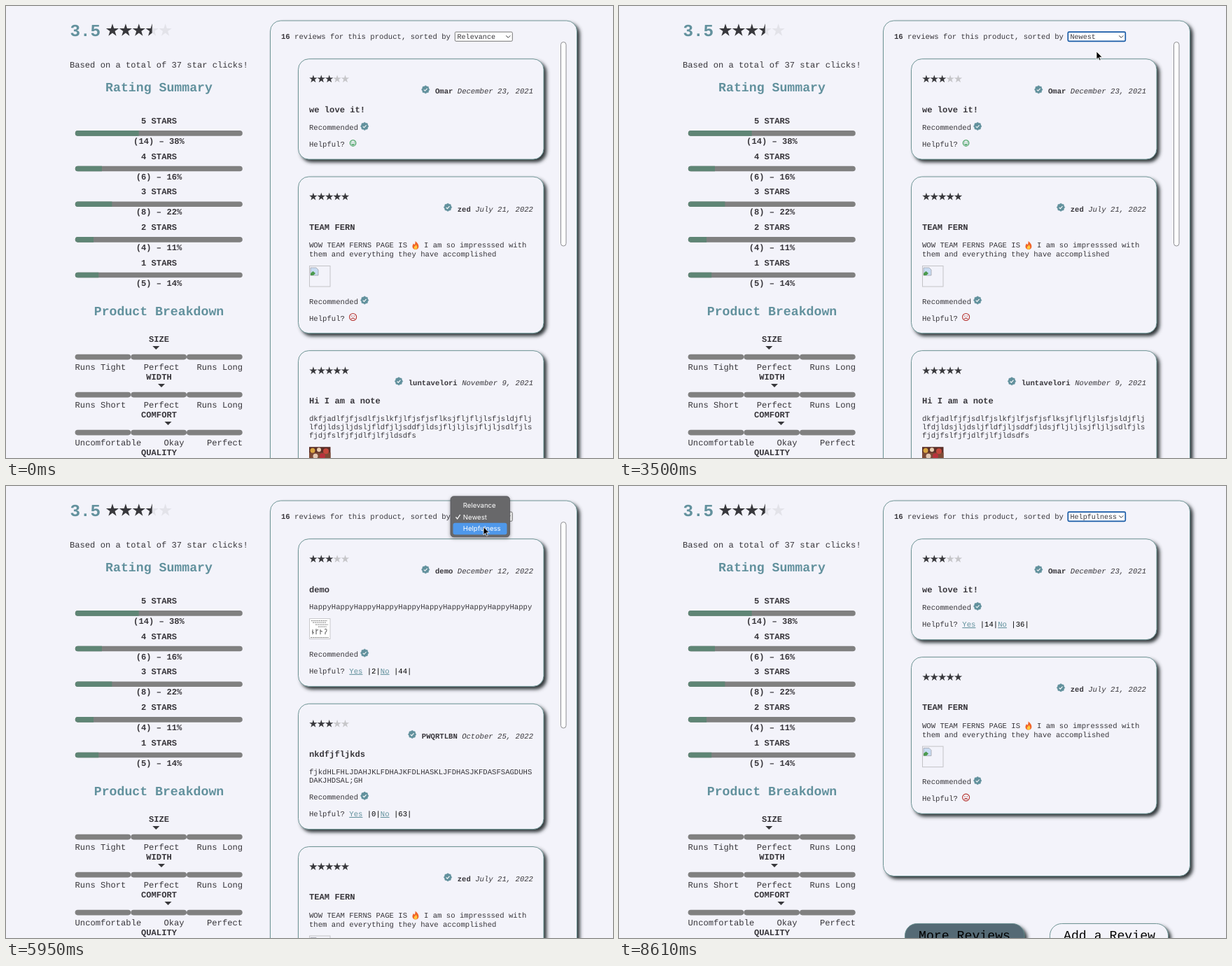
These frames come from a looping animation (867x646 px, 8680 ms). An HTML page:

```html
<!DOCTYPE html>
<html lang="en">
<head>
<meta charset="utf-8">
<title>Product reviews</title>
<style>
  html, body { margin: 0; width: 100%; height: 100%; overflow: hidden; background: #f3f3fa; }
  svg { display: block; }
  text { font: 10.61px "Liberation Mono", monospace; fill: #38363b; white-space: pre; text-rendering: geometricPrecision; }
  .m { font-size: 12.13px; }
  .l { font-size: 18.2px; }
  .xl { font-size: 24.26px; }
  .s { font-size: 10.1px; }
  .b { font-weight: bold; }
  .i { font-style: italic; }
  .k { fill: #000; }
  .teal { fill: #62919d; }
  .u { fill: #62919d; text-decoration: underline; }
  .mid { text-anchor: middle; }
  .end { text-anchor: end; }
  .menu text { font: 9.6px Inter, sans-serif; fill: #fff; }
  .box { fill: #f3f3fa; stroke: #628c8c; stroke-width: .9; filter: url(#shade); }
</style>
</head>
<body>
<svg id="stage" width="867" height="646" viewBox="0 0 867 646"></svg>
<script>
const LOOP = 8680, STEP = 70, CHAR = 6.366;
const INK = '#38383c', TEAL = '#62919d';

const text = (x, y, s, cls = '') => `<text x="${x}" y="${y}" class="${cls}">${s}</text>`;
const rect = (x, y, w, h, r, attrs) => `<rect x="${x}" y="${y}" width="${w}" height="${h}" rx="${r}" ${attrs}/>`;
const use = (id, x, y, attrs = '') => `<use href="#${id}" x="${x}" y="${y}" ${attrs}/>`;
const spikes = (n, R, r) => Array.from({ length: 2 * n }, (_, i) => {
  const a = Math.PI * (i / n - 0.5), d = i % 2 ? r : R;
  return (d * Math.cos(a)).toFixed(2) + ',' + (d * Math.sin(a)).toFixed(2);
}).join(' ');

const face = (id, r, color, mouth) => `<g id="${id}" fill="none" stroke="${color}" stroke-width="1.1">
  <circle r="${r}"/><path d="${mouth}"/><path d="M-1.7 -1.9v1.2M1.7 -1.9v1.2"/></g>`;

const defs = `<defs>
  <filter id="shade" x="-10%" y="-20%" width="125%" height="150%">
    <feDropShadow dx="3.8" dy="3.8" stdDeviation="2.8" flood-color="#30373b"/></filter>
  <filter id="soft" x="-20%" y="-20%" width="140%" height="150%">
    <feDropShadow dx="0" dy="1.5" stdDeviation="2.5" flood-opacity=".4"/></filter>
  <polygon id="star" points="${spikes(5, 6, 2.3)}"/>
  <polygon id="bigStar" points="${spikes(5, 9.6, 3.7)}"/>
  <clipPath id="half"><rect x="-10" y="-10" width="10" height="20"/></clipPath>
  <g id="badge"><polygon points="${spikes(8, 5.7, 4.8)}" fill="${TEAL}" stroke="${TEAL}" stroke-width=".6" stroke-linejoin="round"/>
    <path d="M-2.4 .2L-.7 1.900 2.4 -1.6" fill="none" stroke="#fff" stroke-width="1.1"/></g>
  ${face('happy', 4.2, '#2a9448', 'M-2.2 .9Q0 3.6 2.2 .9')}
  ${face('sad', 5, '#b5302c', 'M-2.3 2.8Q0 .2 2.3 2.8')}
  <g id="flame"><path d="M4.6 0C8 3 9.6 5 9.4 8 9.2 10.6 7.4 12 5 12 2.4 12 .5 10.4 .5 7.8 .5 6 1.4 5 1.8 3.6 2.6 4 3 4.6 3.2 5.3 4.4 4 4.9 2 4.6 0Z" fill="#f0632a"/>
    <path d="M5.2 5C7 7 7.6 8 7.4 9.6 7.1 11.2 6.2 11.8 5 11.8 3.6 11.8 2.6 10.8 2.7 9.4 2.8 8.4 3.4 8 3.6 7.2 4.6 7.4 5.2 6.4 5.2 5Z" fill="#ffc83d"/></g>
  <g id="broken"><rect x=".5" y=".5" width="29.5" height="29.5" fill="none" stroke="#c3c3c7"/>
    <path d="M2 3H10L13 6V14H2Z" fill="#c9dcf3" stroke="#9a9aa0" stroke-width=".7"/><path d="M2 14V11L5.5 8 9 11 6 14Z" fill="#4c9a4f"/></g>
  <g id="sketch"><rect x=".5" y=".5" width="29.5" height="29" fill="#fff" stroke="#c8c8cc"/>
    <path d="M3 3.5H26M5 6H24M9 9H27M13 12H25M2 27.5H28" stroke="#777" stroke-width="1" stroke-dasharray="2 .8"/>
    <path d="M5 16v7M10 15v8M16 16v7M4 19l3 2M10 18l3 -2M16 18l3 1M22 16q3 -2 3 1t-2 3v3" fill="none" stroke="#555"/></g>
  <g id="photo"><rect width="30.5" height="30" fill="#5a2f28"/><rect y="8" width="30.5" height="22" fill="#7d4a35"/>
    <circle cx="5" cy="5" r="3.5" fill="#d9a441"/><circle cx="14" cy="4" r="3" fill="#e8cdb0"/><circle cx="24" cy="6" r="4" fill="#c4483c"/>
    <circle cx="9" cy="13" r="3.5" fill="#e3c9b5"/><circle cx="19" cy="13" r="4" fill="#b8323c"/></g>
</defs>`;

// Left column
const summary = () => {
  let out = text(91.5, 42.7, '3.5', 'xl b teal') + text(91, 87.8, 'Based on a total of 37 star clicks!', 'm');
  for (let i = 0; i < 5; i++) out += use('bigStar', 152 + 18.9 * i, 34.9, `fill="${i < 3 ? INK : '#e3e3e9'}"`);
  out += `<g transform="translate(208.7 34.9)"><use href="#bigStar" fill="${INK}" clip-path="url(#half)"/></g>`;
  out += text(218.5, 122, 'Rating Summary', 'l b teal mid') + text(218.5, 441.5, 'Product Breakdown', 'l b teal mid');

  [[14, 38], [6, 16], [8, 22], [4, 11], [5, 14]].forEach(([count, pct], i) => {
    const y = 178.1 + 50.65 * i, w = 239 * pct / 100;
    out += text(218.5, y - 10, `${5 - i} STARS`, 'm b mid') + rect(98.8, y, 239, 7.6, 3.8, 'fill="#808080"');
    out += `<path d="M${98.8 + w} ${y}H102.6a3.8 3.8 0 0 0 0 7.6H${98.8 + w}Z" fill="#5f8575"/>`;
    out += text(218.5, y + 19, `(${count}) – ${pct}%`, 'm b mid');
  });

  [['SIZE', 214.3, 'Runs Tight', 'Perfect', 196.7, 'Runs Long'],
   ['WIDTH', 222, 'Runs Short', 'Perfect', 196.7, 'Runs Long'],
   ['COMFORT', 231.5, 'Uncomfortable', 'Okay', 225.4, 'Perfect'],
   ['QUALITY', 222, '', '', 0, '']].forEach(([name, mark, low, fit, fitX, high], i) => {
    const y = 480 + 54 * i;
    out += text(218.5, y, name, 'm b mid') + `<path d="M${mark - 5} ${y + 6}h10l-5 5z" fill="${INK}"/>`;
    for (let j = 0; j < 3; j++) out += rect(98.6 + 79.7 * j, y + 17.8, 79.7, 7.6, 3.8, 'fill="#808080"');
    out += text(98.6, y + 40, low, 'm') + text(fitX, y + 40, fit, 'm') + text(338, y + 40, high, 'm end');
  });
  return out;
};

// One review card; returns its markup and the top of the next one
const card = (top, r) => {
  const x = 433;
  let out = '', y = top + (r.body && !r.flame ? 100.4 : 101.2);
  for (let i = 0; i < 5; i++) out += use('star', 438.9 + 11.4 * i, top + 28.7, `fill="${i < r.stars ? INK : '#c6c6c9'}"`);
  out += text(753, top + 49.7, `<tspan class="b">${r.name}</tspan> <tspan class="i">${r.date}</tspan>`, 'end');
  out += use('badge', 753 - CHAR * (r.name.length + r.date.length + 1) - 13.7, top + 43.7);
  out += text(x, top + 75.8, r.title, 'm b');
  if (r.body) {
    if (r.flame) out += use('flame', 580, y - 9.2) + text(597, y, r.flame);
    r.body.forEach((line, i) => {
      if (i) y += r.flame ? 12.8 : 12.1;
      out += text(x, y, line);
    });
    if (r.pic) out += use(r.pic, x, y + 13);
    y += r.pic ? 67.5 : 24;
  }
  out += text(x, y, 'Recommended') + use('badge', 512.2, y - 5);
  y += 24.2;
  out += text(x, y, 'Helpful?');
  if (r.votes) {
    const [yes, no] = r.votes;
    out += text(x + 9 * CHAR, y, `<tspan class="u">Yes</tspan> |${yes}|<tspan class="u">No</tspan> |${no}|`, 'k');
    y += 0.6;
  } else out += use(r.face, 495.6, y - 5.2);
  const bottom = y + 18;
  return [rect(417.5, top, 350.5, bottom - top, 15, 'class="box"') + out, bottom + 24.9];
};

const list = (id, height, thumb, reviews) => {
  let out = rect(377.5, 21, 438, height, 15, 'class="box"'), top = 75.7;
  for (const r of reviews) {
    const [markup, next] = card(top, r);
    out += markup;
    top = next;
  }
  if (thumb) out += rect(792.5, 51.5, 7.5, thumb, 3.75, 'fill="#fff" stroke="#8c8c90"');
  return `<g id="${id}">${out}</g>`;
};

const love = { stars: 3, name: 'Omar', date: 'December 23, 2021', title: 'we love it!', face: 'happy' };
const team = { stars: 5, name: 'zed', date: 'July 21, 2022', title: 'TEAM FERN', pic: 'broken', face: 'sad',
  body: ['WOW TEAM FERNS PAGE IS', 'them and everything they have accomplished'], flame: 'I am so impresssed with' };
const note = { stars: 5, name: 'luntavelori', date: 'November 9, 2021', title: 'Hi I am a note', pic: 'photo', face: 'happy',
  body: ['dkfjadlfjfjsdlfjslkfjlfjsfjsflksjfljfljlsfjsldjflj', 'lfdjldsjljdsljfldfjljsddfjldsjfljljlsjfljljsdlfjls', 'fjdjfslfjfjdlfjlfjldsdfs'] };
const demo = { stars: 3, name: 'demo', date: 'December 12, 2022', title: 'demo', pic: 'sketch', votes: [2, 44],
  body: ['Happy'.repeat(10)] };
const keys = { stars: 3, name: 'PWQRTLBN', date: 'October 25, 2022', title: 'nkdfjfljkds', votes: [0, 63],
  body: ['fjkdHLFHLJDAHJKLFDHAJKFDLHASKLJFDHASJKFDASFSAGDUHS', 'DAKJHDSAL;GH'] };

const pill = (id, x, w, label) => rect(x, 625.5, w, 36, 17, `id="${id}" class="box"`) + text(x + 19.5, 647.5, label, 'l k');

const OPTIONS = ['Relevance', 'Newest', 'Helpfulness'];
const menu = `<g id="menu" class="menu">${rect(635, 0, 84.5, 58, 4.5, 'fill="#68686b" stroke="#555558" stroke-width=".8" filter="url(#soft)"')}
  ${rect(638.5, 0, 77, 16.7, 3, 'id="hover" fill="#4f98ea"')}
  ${OPTIONS.map((o, i) => text(652.8, 16.2 + 16.7 * i, o)).join('')}
  <path id="tick" d="M642.5 0l2.2 2.7 4 -6" fill="none" stroke="#fff" stroke-width="1.3"/></g>`;

const $ = id => document.getElementById(id);
$('stage').innerHTML = defs + summary() +
  list('relevance', 720, 291.5, [love, team, note]) +
  list('newest', 720, 294.5, [demo, keys, team]) +
  list('helpful', 536.5, 0, [{ ...love, votes: [14, 36] }, team]) +
  `<g id="buttons">${pill('more', 408.5, 170.5, 'More Reviews')}${pill('add', 615.5, 169, 'Add a Review')}</g>` +
  text(393, 47.3, '<tspan class="b">16</tspan> reviews for this product, sorted by') +
  rect(641.3, 37.1, 82, 13.2, 1.5, 'id="select" fill="#fff"') +
  '<text id="choice" x="644.5" y="47.2" class="s"></text>' +
  `<path d="M714.3 42.3l3 3 3 -3" fill="none" stroke="${INK}"/>` + menu +
  '<path id="cursor" d="M0 0V11.3L2.7 8.9 4.4 12.9 6.2 12.1 4.5 8.2H8.2Z" fill="#000" stroke="#fff" stroke-width=".8"/>';

// Pointer path: time, x, y
const PATH = [
  [70, 98, 632], [140, 235, 455], [280, 610, 100], [350, 744, 22], [420, 664, 14],
  [630, 664, 14], [910, 685, 44], [1120, 678, 41], [2170, 678, 41], [2380, 680, 56], [3080, 682, 65],
  [4480, 682, 65], [4690, 694, 44], [5320, 694, 44], [5880, 683, 58], [6160, 679, 60],
  [7630, 679, 60], [7980, 614, 398], [8120, 614, 398], [8400, 560, 560], [8540, 508, 632], [8610, 495, 652], [LOOP, 495, 652]
];
const MENUS = [{ open: 1470, close: 2870, end: 3150, top: 31.5, pick: 0 }, { open: 4830, close: 5950, end: 6230, top: 14.8, pick: 1 }];

const pointer = t => {
  const i = Math.max(1, PATH.findIndex(p => p[0] >= t));
  const [t0, x0, y0] = PATH[i - 1], [t1, x1, y1] = PATH[i];
  const k = (t - t0) / (t1 - t0);
  return [x0 + (x1 - x0) * k, y0 + (y1 - y0) * k];
};
const show = (id, on) => { $(id).style.display = on ? '' : 'none'; };

function draw(t) {
  const [x, y] = pointer(t);
  show('cursor', t >= 70);
  $('cursor').setAttribute('transform', `translate(${x} ${y})`);

  show('relevance', t < 3570);
  show('newest', t >= 3570 && t < 6580);
  show('helpful', t >= 6580);
  show('buttons', t >= 6580);
  $('more').style.fill = t >= 8540 ? '#546b74' : '';

  const m = MENUS.find(m => t >= m.open && t < m.end);
  show('menu', m);
  if (m) {
    const row = Math.max(0, Math.min(2, Math.floor((y - m.top - 4.5) / 16.7)));
    $('menu').setAttribute('transform', `translate(0 ${m.top})`);
    $('menu').style.opacity = Math.min(1, (m.end - t) / (m.end - m.close));
    $('hover').setAttribute('y', 4.5 + 16.7 * row);
    $('tick').setAttribute('transform', `translate(0 ${12.8 + 16.7 * m.pick})`);
  }

  const focus = t >= 1470 && (!m || t < m.open + 350);
  $('select').setAttribute('stroke', focus ? '#185ba6' : '#767676');
  $('select').setAttribute('stroke-width', focus ? 1.7 : 1);
  $('choice').textContent = OPTIONS[t < 3150 ? 0 : t < 6230 ? 1 : 2];
}

const start = performance.now();
function tick() {
  const t = (performance.now() - start) % LOOP;
  draw(Math.floor(t / STEP) * STEP);
  requestAnimationFrame(tick);
}
tick();
</script>
</body>
</html>
```
